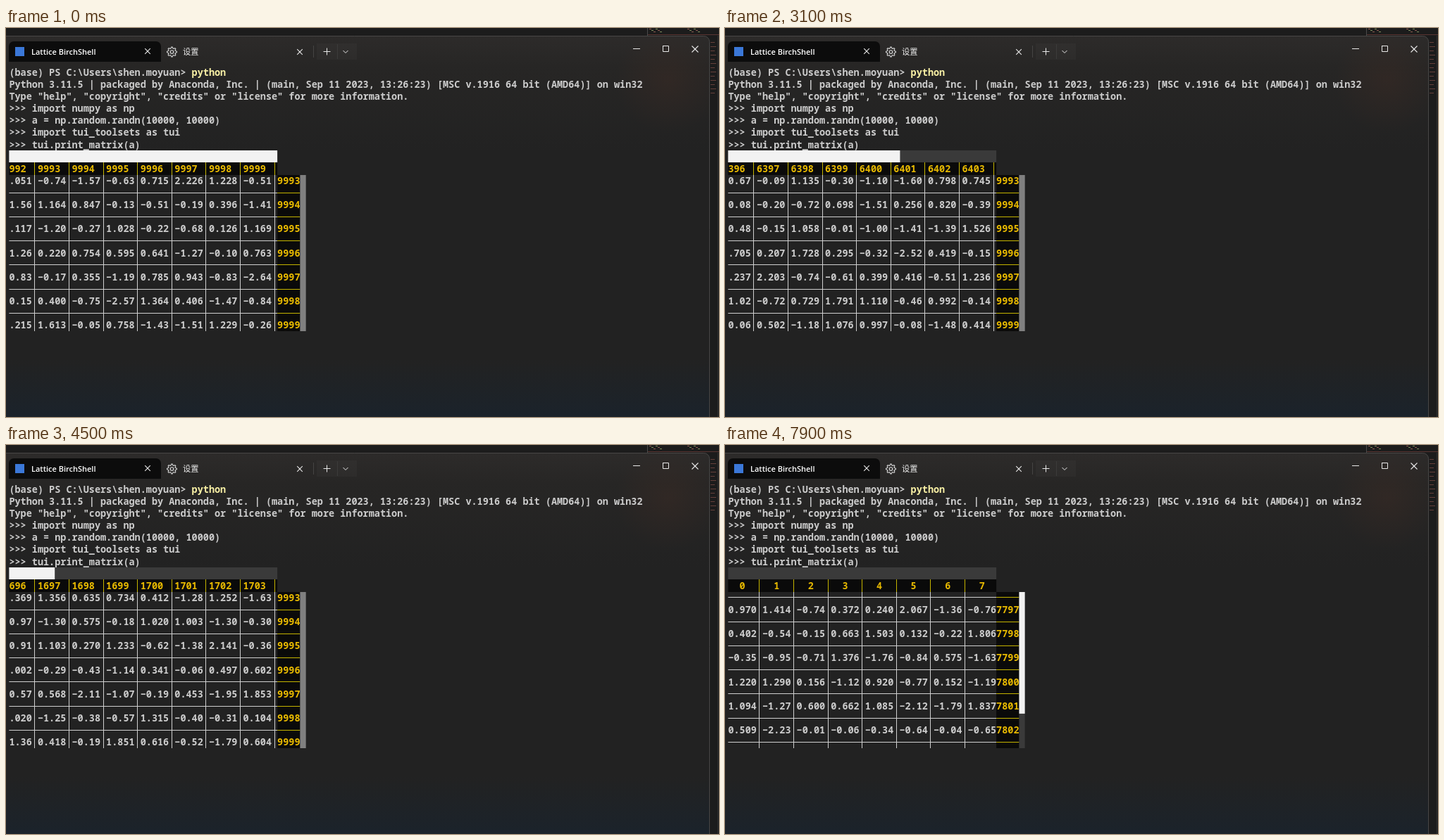
Write an HTML page with a canvas that moves like this. It is 1012x553 px and loops after 8000 ms.

```html
<!DOCTYPE html>
<html lang="zh">
<head>
<meta charset="utf-8">
<title>Matrix viewer</title>
<style>
html, body { margin: 0; width: 100%; height: 100%; overflow: hidden; background: #1e1e1e; }
canvas { display: block; }
</style>
</head>
<body>
<canvas id="stage" width="1012" height="553"></canvas>
<script>
const ctx = document.getElementById('stage').getContext('2d');
const LOOP = 8000;
const LEFT = 4.4, TOP = 54.5, CW = 8.1, LH = 17.12;   // terminal character grid
const VIEW_COLS = 47, VIEW_ROWS = 13;
const MAX_X = 60000 - VIEW_COLS, MAX_Y = 19999 - VIEW_ROWS;
const MONO = '600 13.5px "Noto Sans Mono", "DejaVu Sans Mono", monospace';
const TEXT = '#cccccc', GOLD = '#e6b800', GOLD_LINE = '#c4b400', GRID = '#cfcfcf';
const LIT = '#f2f2f2', TRACK = '#3a3a3a', BLACK = '#0a0a0a', ICON = '#e8e8e8';

const clamp = (v, lo, hi) => Math.min(hi, Math.max(lo, v));
const colX = i => LEFT + i * CW;
const lineY = i => Math.round(TOP + i * LH);

function rect(x, y, w, h, color) {
  ctx.fillStyle = color;
  ctx.fillRect(x, y, w, h);
}

function text(str, x, y, color, font = MONO) {
  ctx.font = font;
  ctx.fillStyle = color;
  ctx.fillText(str, x, y);
}

function print(str, col, line, color = TEXT) {
  text(str, colX(col), Math.round(TOP + line * LH + 13.3), color);
}

function path(points, color = ICON, width = 1) {
  ctx.beginPath();
  points.forEach(([x, y]) => ctx.lineTo(x, y));
  ctx.strokeStyle = color;
  ctx.lineWidth = width;
  ctx.stroke();
}

function cross(x, y, r) {
  path([[x - r, y - r], [x + r, y + r]], ICON, 1.1);
  path([[x - r, y + r], [x + r, y - r]], ICON, 1.1);
}

function rand(r, c, salt) {
  let h = Math.imul(r + 1, 374761393) ^ Math.imul(c + 7, 668265263) ^ Math.imul(salt, 2246822519);
  h = Math.imul(h ^ h >>> 15, 1274126177);
  h = Math.imul(h ^ h >>> 13, 3266489917);
  return ((h ^ h >>> 16) >>> 0) / 4294967296;
}

// Normally distributed value, cut to five characters.
function cell(r, c) {
  const radius = Math.sqrt(-2 * Math.log(rand(r, c, 1) + 1e-9));
  const value = radius * Math.cos(2 * Math.PI * rand(r, c, 2));
  return value.toFixed(3).slice(0, 5).replace('-', '\u2212');
}

function heading(c) {
  const s = String(c);
  return s.padStart(s.length + (5 - s.length >> 1)).padEnd(5);
}

// Scroll positions in percent; a held key repeats about 3.3 times per 100 ms.
const repeats = (t, start, lag) => Math.floor(Math.floor((t - start) / 100) * 10 / 3 - lag);

function percentX(t) {
  if (t < 1600) return 100;
  if (t < 2100) return 99;
  return Math.max(0, 99 - repeats(t, 2000, 1.2));
}

function percentY(t) {
  if (t < 6900) return 100;
  if (t < 7300) return 98.975;
  return 99 - repeats(t, 7200, 2);
}

function drawBackdrop() {
  rect(0, 0, 1012, 553, '#1c1c1c');
  rect(910, 0, 1, 11, '#4a4a4a');
  for (let i = 0; i < 12; i++) {
    rect(913 + i % 6 * 3 + (i > 5 ? 54 : 0), 1 + i % 3 * 2, 3, 1, i % 2 ? '#7d8b5c' : '#8a5a50');
  }
  rect(911, 9, 101, 1, '#5a3532');
  for (let y = 20; y < 96; y += 6) rect(1000, y, 6 + y % 4, 1, '#65403a');
  rect(1010, 11, 1, 542, '#303030');

  const base = ctx.createLinearGradient(0, 11, 0, 553);
  base.addColorStop(0, '#2d2b2a');
  base.addColorStop(0.08, '#272625');
  base.addColorStop(0.3, '#222222');
  base.addColorStop(0.85, '#222222');
  base.addColorStop(1, '#1b232b');
  ctx.fillStyle = base;
  ctx.strokeStyle = '#484746';
  ctx.lineWidth = 1;
  ctx.beginPath();
  ctx.roundRect(-10, 11.5, 1008.5, 560, 8);
  ctx.fill();
  ctx.stroke();

  const glow = ctx.createRadialGradient(940, 75, 0, 940, 75, 75);
  glow.addColorStop(0, 'rgba(90,50,35,.2)');
  glow.addColorStop(1, 'rgba(90,50,35,0)');
  rect(860, 12, 138, 140, glow);
}

function drawGear(x, y) {
  ctx.strokeStyle = '#dddddd';
  ctx.lineWidth = 1.1;
  ctx.beginPath();
  for (let i = 0; i <= 64; i++) {
    const a = i / 64 * 2 * Math.PI, r = 6 + clamp(2 * Math.cos(8 * a), -0.9, 0.9);
    ctx.lineTo(x + r * Math.cos(a), y + r * Math.sin(a));
  }
  ctx.stroke();
  ctx.beginPath();
  ctx.arc(x, y, 2.3, 0, 7);
  ctx.stroke();
}

function drawTitleBar(hover) {
  ctx.fillStyle = '#0c0c0c';
  ctx.beginPath();
  ctx.roundRect(4, 19, 216, 29, [7, 7, 0, 0]);
  ctx.fill();
  rect(13, 27, 13, 13, '#3b78d8');
  text('Lattice BirchShell', 36, 38, '#ffffff', '600 11px "Open Sans", "Noto Sans", sans-serif');
  cross(201, 33, 3.8);

  drawGear(235.5, 34);
  text('设置', 251, 38, '#eeeeee', '500 11.3px "Noto Sans CJK SC", "Noto Sans CJK", sans-serif');
  cross(417, 34, 3.8);

  rect(436, 25, 1, 17, '#454443');
  rect(441, 22, 57, 23, 'rgba(255,255,255,.025)');
  rect(470, 23, 1, 21, '#3c3b3a');
  path([[450.5, 33.5], [460.5, 33.5]]);
  path([[455.5, 28.5], [455.5, 38.5]]);
  path([[478.5, 32], [482, 35.5], [485.5, 32]]);

  if (hover) rect(957, 12, 42, 36, '#c42b1c');
  path([[890, 29.5], [900, 29.5]]);
  path([[932.5, 25.5], [940.5, 25.5], [940.5, 33.5], [932.5, 33.5], [932.5, 25]]);
  cross(978, 30, 4.5);
}

function drawSession() {
  const prompt = '(base) PS C:\\Users\\shen.moyuan> ';
  print(prompt, 0, 0);
  print('python', prompt.length, 0, '#f9f1a5');
  [
    'Python 3.11.5 | packaged by Anaconda, Inc. | (main, Sep 11 2023, 13:26:23) [MSC v.1916 64 bit (AMD64)] on win32',
    'Type "help", "copyright", "credits" or "license" for more information.',
    '>>> import numpy as np',
    '>>> a = np.random.randn(10000, 10000)',
    '>>> import tui_toolsets as tui',
    '>>> tui.print_matrix(a)'
  ].forEach((s, i) => print(s, 0, i + 1));
}

function drawMatrix(t) {
  const px = percentX(t), py = percentY(t);
  const x0 = clamp(600 * px - 23, 0, MAX_X);
  const y0 = clamp(Math.floor(199.99 * py) - 6, 0, MAX_Y);
  const firstCol = Math.floor(x0 / 6), shift = x0 % 6;
  const barTop = lineY(7), headTop = lineY(8), top = lineY(9), height = lineY(22) - top;
  const right = colX(VIEW_COLS), width = right - LEFT;
  const cols = Array.from({ length: 9 }, (_, i) => firstCol + i).filter(c => c < 10000);
  const row = format => cols.map(format).join(' ').slice(shift, shift + VIEW_COLS);

  // Both bars advance in eighths of a character.
  const barWidth = Math.round(px / 100 * VIEW_COLS * 8) / 8 * CW;
  const barHeight = Math.floor(py / 100 * VIEW_ROWS * 8) / 8 / VIEW_ROWS * height;
  rect(LEFT, barTop, width, headTop - barTop, TRACK);
  rect(LEFT, barTop, barWidth, headTop - barTop, LIT);

  rect(LEFT, headTop, width, top - headTop, BLACK);
  print(row(heading), 0, 8, GOLD);
  rect(right, top, 4 * CW, height, BLACK);

  for (let i = 0; i < VIEW_ROWS; i++) {
    const line = y0 + i, r = line >> 1;
    if (line % 2) {
      const y = Math.round(TOP + (9.5 + i) * LH - 0.7);
      rect(LEFT, y, width, 1, GRID);
      rect(right, y, 4 * CW, 1, GOLD_LINE);
    } else {
      print(row(c => cell(r, c)), 0, 9 + i);
      print(String(r), VIEW_COLS, 9 + i, GOLD);
    }
  }

  for (let i = 5 - shift; i < VIEW_COLS; i += 6) {
    const x = Math.round(colX(i + 0.5) - 0.5);
    rect(x, headTop, 1, top - headTop, GOLD_LINE);
    rect(x, top, 1, height, GRID);
  }

  const barX = colX(VIEW_COLS + 4);
  rect(barX, top, CW, height, TRACK);
  rect(barX, top, CW, barHeight, t < 6100 ? '#808080' : LIT);
}

function frame(now) {
  const t = now % LOOP;
  drawBackdrop();
  drawTitleBar(t >= 100 && t < 300);
  drawSession();
  drawMatrix(t);
  requestAnimationFrame(frame);
}
requestAnimationFrame(frame);
</script>
</body>
</html>
```
